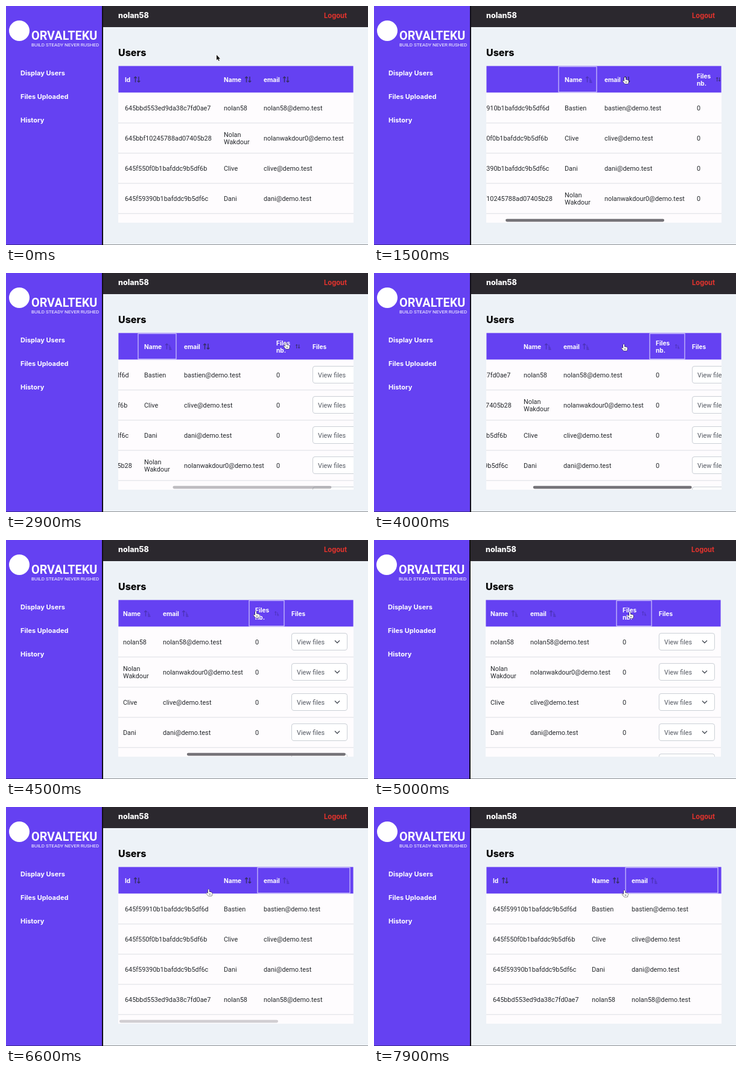
Write an HTML page with a canvas that moves like this. It is 600 px wide and 396 px high and loops after 8 s.

```html
<!DOCTYPE html>
<html lang="en">
<head>
<meta charset="utf-8">
<title>Users table</title>
<style>
  html, body { margin: 0; width: 100%; height: 100%; overflow: hidden; background: #edf2f7; }
  canvas { display: block; }
</style>
</head>
<body>
<canvas id="stage" width="600" height="396"></canvas>
<script>
const ctx = document.getElementById('stage').getContext('2d');
const LOOP = 8000, STEP = 100;
const PURPLE = '#6541f2', INK = '#25282c', ICON = '#352c68', ICON_SORTED = '#4c32b9';
const BODY = '10.85px Roboto, sans-serif';
const HEAD = 'bold 10.2px Inter, sans-serif';
const MENU = 'bold 11px Inter, sans-serif';

const user = (id, name) => ({ id, name, email: name.toLowerCase().replace(' ', '') + '@demo.test', count: '0' });
const users = [
  user('645bbd553ed9da38c7fd0ae7', 'nolan58'),
  user('645bbf10245788ad07405b28', 'Nolan Wakdour0'),
  user('645f550f0b1bafddc9b5df6b', 'Clive'),
  user('645f59390b1bafddc9b5df6c', 'Dani'),
  user('645f59910b1bafddc9b5df6d', 'Bastien'),
];
users[1].name = 'Nolan Wakdour';

const columns = [
  { key: 'id', label: 'Id', x: 197, iconX: 212 },
  { key: 'name', label: 'Name', x: 361, iconX: 396, width: 64 },
  { key: 'email', label: 'email', x: 427, iconX: 459, width: 154 },
  { key: 'count', label: 'Files nb.', x: 580, iconX: 612, width: 59, iconScale: .7 },
  { key: 'files', label: 'Files', x: 640 },
];

const clicks = [{ at: 600, key: 'name' }, { at: 3000, key: 'count' }, { at: 5800, key: 'email' }];

// Moves: begin and end time, then the values reached
const scrolling = [[1000, 2470, 132], [3300, 4000, 113], [4000, 4500, 167], [5900, 6150, 0]];
const pointing = [[0, 500, 378, 116], [900, 1300, 415, 118], [1900, 2500, 463, 115], [3200, 3800, 413, 118],
  [4500, 4900, 423, 119], [5200, 5600, 293, 118], [6300, 7100, 425, 176], [7300, 7900, 414, 138]];

const clamp = v => Math.min(1, Math.max(0, v));
const linear = u => u;
const smooth = u => u * u * (3 - 2 * u);

function follow(start, moves, t, ease) {
  return moves.reduce((pos, [begin, end, ...goal]) => {
    const u = ease(clamp((t - begin) / (end - begin)));
    return pos.map((v, i) => v + (goal[i] - v) * u);
  }, start);
}

// The bar stays for a moment after each scroll, then fades
function barAlpha(t) {
  return Math.max(...scrolling.map(([begin, end]) => t > begin ? clamp((end + 500 - t) / 150) : 0));
}

function rect(x, y, w, h, color) {
  ctx.fillStyle = color;
  ctx.fillRect(x, y, w, h);
}

function roundRect(x, y, w, h, r, color) {
  ctx.beginPath();
  ctx.roundRect(x, y, w, h, r);
  ctx.fillStyle = color;
  ctx.fill();
}

function text(str, x, y, font, color) {
  ctx.font = font;
  ctx.fillStyle = color;
  ctx.fillText(str, x, y);
}

// One line per word, centred on y
function cellText(str, x, y, font, color) {
  const lines = str.split(' ');
  lines.forEach((line, i) => text(line, x, y + 4 + (i - (lines.length - 1) / 2) * 12, font, color));
}

function stroke(path, color, width) {
  ctx.strokeStyle = color;
  ctx.lineWidth = width;
  ctx.stroke(new Path2D(path));
}

function at(x, y, scale, draw) {
  ctx.save();
  ctx.translate(x, y);
  ctx.scale(scale, scale);
  draw();
  ctx.restore();
}

function sortIcon(x, scale, sorted) {
  const right = sorted ? 'M6.2 3.4h1.4M6.2 5.6h2.4M6.2 7.8h3.4M6.2 10h4.2' : 'M8 .5V9.6M5.8 7.4L8 9.6 10.2 7.4';
  at(x, 121.5 - 5 * scale, scale, () =>
    stroke('M2.5 10V.8M.3 3L2.5.8 4.7 3' + right, sorted ? ICON_SORTED : ICON, 1.4));
}

function select(x, y) {
  roundRect(x, y, 93, 29, 4.5, '#cbd0d6');
  roundRect(x + 1, y + 1, 91, 27, 3.5, '#fff');
  text('View files', x + 9, y + 18.5, BODY, '#555a63');
  at(x + 76, y + 14.5, 1, () => stroke('M-4-2L0 2 4-2', '#454b54', 1.3));
}

function drawPage() {
  rect(0, 0, 160, 396, PURPLE);
  rect(159, 0, 2, 396, '#100d18');
  rect(161, 0, 440, 35, '#2b282e');
  rect(0, 395, 601, 1, 'rgba(0,0,0,.4)');

  roundRect(5, 24, 34, 34, 17, '#fff');
  text('ORVALTEKU', 42, 56, 'bold 19.8px Roboto, sans-serif', '#fff');
  text('BUILD STEADY NEVER RUSHED', 42, 66.5, '8px Roboto, sans-serif', '#fff');

  ['Display Users', 'Files Uploaded', 'History'].forEach((label, i) =>
    text(label, 24, 115 + i * 39, MENU, '#fff'));
  text('nolan58', 186, 20, '800 12.5px Inter, sans-serif', '#fff');
  text('Logout', 527, 20, 'bold 11.2px Inter, sans-serif', '#e5332d');
  text('Users', 186, 82.5, '800 16px Inter, sans-serif', '#050505');
}

function drawTable(scroll, sortKey) {
  rect(186, 99, 390, 260, '#fefcfe');
  rect(186.4, 99.4, 389.2, 44, PURPLE);
  ctx.save();
  ctx.beginPath();
  ctx.rect(186, 99, 390, 260);
  ctx.clip();
  ctx.translate(-Math.round(scroll), 0);

  for (const { key, label, x, iconX, width, iconScale = 1 } of columns) {
    cellText(label, x, 121.5, HEAD, '#fff');
    // All counts are equal, so sorting by them marks every column
    if (iconX) sortIcon(iconX, iconScale, sortKey === key || sortKey === 'count');
    if (key === sortKey) {
      ctx.strokeStyle = '#c8bdfb';
      ctx.lineWidth = 1.3;
      ctx.strokeRect(x - 10, 100.4, width - 1, 42.2);
    }
  }

  const rows = [...users];
  if (sortKey) rows.sort((a, b) => (a[sortKey] > b[sortKey]) - (a[sortKey] < b[sortKey]));
  rows.forEach((row, i) => {
    const y = 169 + i * 50;
    for (const { key, x } of columns) if (row[key]) cellText(row[key], x, y, BODY, INK);
    select(640, y - 15);
    rect(186, y + 24.4, 560, 1, '#dcdee3');
  });
  ctx.restore();
}

function drawScrollbar(scroll, alpha) {
  ctx.globalAlpha = alpha;
  roundRect(188 + scroll * .67, 352.8, 263, 4.6, 2.3, '#757378');
  ctx.globalAlpha = 1;
}

function drawCursor(x, y) {
  const hand = y > 99 && y < 143;
  const shape = new Path2D(hand
    ? 'M0 1Q0 0 1 0T2 1V4.2L5.4 4.8Q7 5.2 7 6.6L6.3 10.8H.6L-2.6 6.8Q-2.8 5.4-1.4 5.8L0 7Z'
    : 'M0 0V10L2.3 7.9 4 11.5 5.5 10.8 3.9 7.4H7Z');
  at(x, y, hand ? 1 : .87, () => {
    ctx.lineJoin = 'round';
    ctx.lineWidth = hand ? 1 : 1.5;
    ctx.strokeStyle = hand ? '#111' : '#fff';
    ctx.fillStyle = hand ? '#fff' : '#111';
    ctx.stroke(shape);
    ctx.fill(shape);
    if (hand) stroke('M2.2 7v2M3.8 7v2', '#111', .6);
  });
}

function render() {
  const t = Math.floor(performance.now() % LOOP / STEP) * STEP;
  const [scroll] = follow([0], scrolling, t, linear);
  const lastClick = clicks.filter(click => click.at <= t).pop();
  const overscroll = t >= 4800 && t < 5600 ? -1 : 0;

  rect(0, 0, 600, 396, '#edf2f7');
  at(overscroll, 0, 1, () => {
    drawPage();
    drawTable(scroll, lastClick?.key);
    drawScrollbar(scroll, barAlpha(t));
  });
  drawCursor(...follow([349, 81], pointing, t, smooth));
  requestAnimationFrame(render);
}
render();
</script>
</body>
</html>
```
